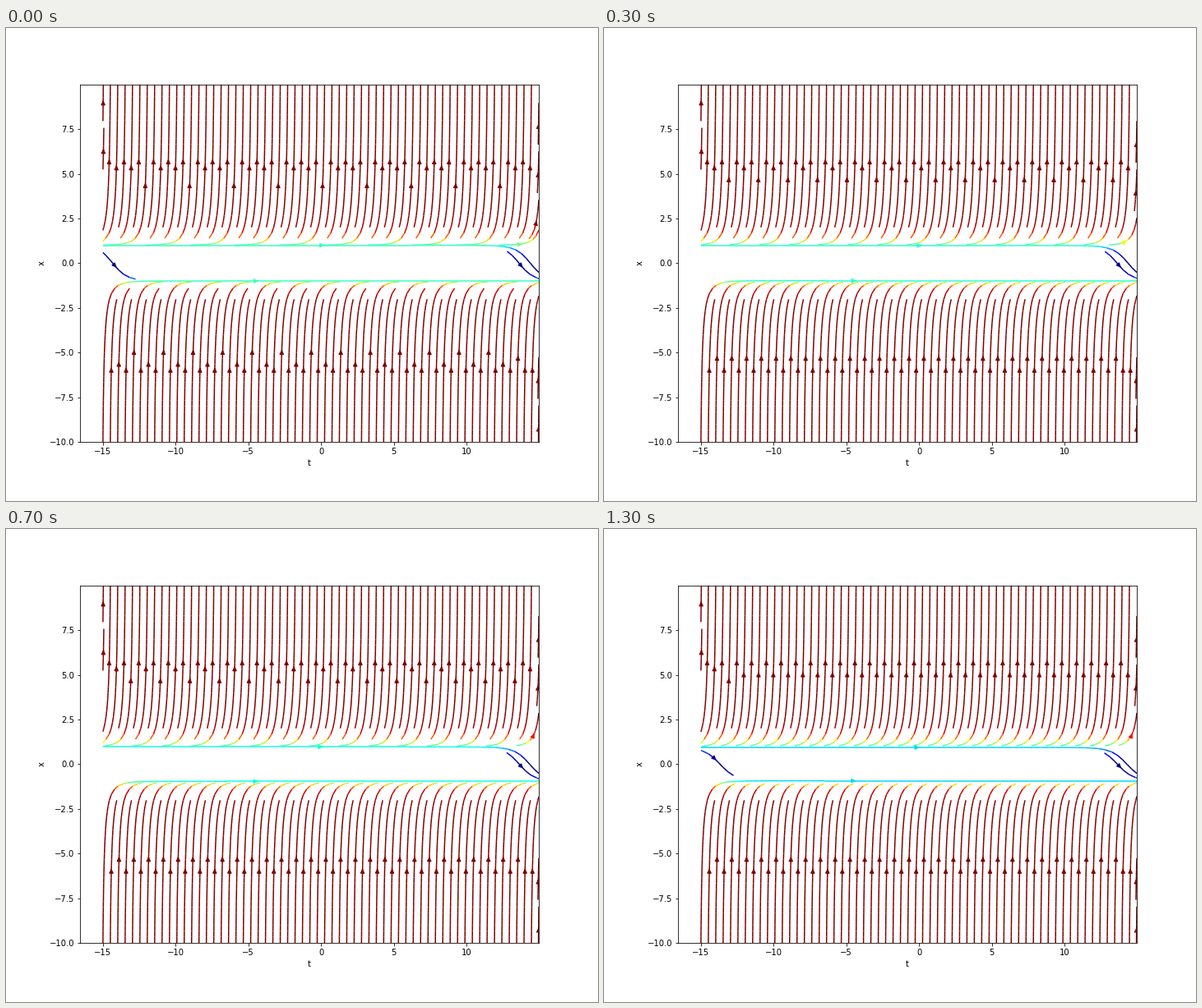
A matplotlib script that plays this animation: 720x576 px, repeating every 1400 ms.

```python
import numpy as np
import matplotlib.pyplot as plt
from matplotlib import streamplot
from matplotlib.animation import ArtistAnimation

FRAMES, INTERVAL = 14, 100
LEFT, RIGHT, BOTTOM, TOP = -15, 14.98, -10, 9.98

# The field does not depend on t, so a few columns are enough.
t = np.linspace(LEFT, RIGHT, 4)
x = np.linspace(BOTTOM, TOP, 1000)
X = np.repeat(x[:, None], len(t), axis=1)
rows = np.arange(len(x))


def interpolate_rows(field, xi, yi):
    """Linear interpolation along x only; much faster than the 2D default."""
    column = field.data[:, 0]
    if isinstance(yi, np.ndarray):
        return np.interp(yi, rows, column)
    j = min(int(yi), len(x) - 2)
    low = float(column[j])
    return low + (yi - j) * (float(column[j + 1]) - low)


streamplot.interpgrid = interpolate_rows


def unit_field(mu):
    """Unit direction field of dx/dt = x^2 - mu."""
    slope = X**2 - mu
    length = np.hypot(1, slope)
    return 1 / length, slope / length


fig = plt.figure(figsize=(10, 8), dpi=72, facecolor="white")
ax = fig.add_axes([0.125, 0.125, 0.775, 0.755])

# The colours keep to the slopes at mu = 1 while the flow changes.
shade = unit_field(1)[1]


def streams(frame):
    first_arrow = len(ax.patches)
    dt, dx = unit_field(1 - 0.01 * frame)
    plot = ax.streamplot(t, x, dt, dx, density=2, color=shade, cmap="jet")
    return [plot.lines, *ax.patches[first_arrow:]]


scenes = [streams(frame) for frame in range(FRAMES)]
ax.set_xlim(LEFT - (RIGHT - LEFT) / 19, RIGHT)
ax.set_ylim(BOTTOM, TOP)
ax.set_xlabel("t")
ax.set_ylabel("x")

anim = ArtistAnimation(fig, scenes, interval=INTERVAL, repeat=True,
                       repeat_delay=0)
plt.show()
```
